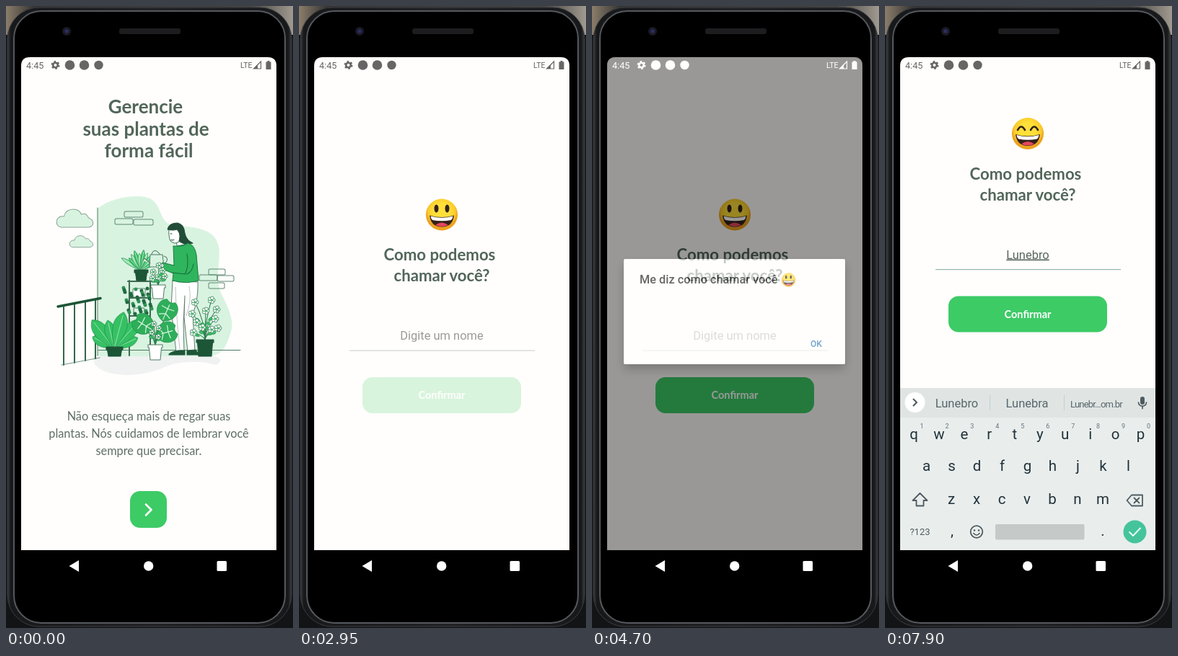
Recreate the animation shown at these times as an HTML page. Size 398x863 px, loop 8000 ms.

```html
<!DOCTYPE html>
<html lang="pt-BR">
<head>
<meta charset="utf-8">
<title>Plant care app</title>
<style>
  html, body { margin: 0; width: 100%; height: 100%; overflow: hidden; background: #131416; }
  svg { display: block; width: 398px; height: 863px; font-family: Roboto, sans-serif; }
  .mid { text-anchor: middle; }
  .geo { font-family: Lato, sans-serif; text-anchor: middle; fill: #52665a; }
  .title { font-weight: 700; font-size: 26px; }
  .ask { font-weight: 700; font-size: 22.2px; }
  .body { font-size: 16.3px; fill: #5f6f67; }
  .key { font-size: 20.5px; fill: #22323a; text-anchor: middle; }
  .caps .key { text-transform: uppercase; }
  .small { font-size: 9px; fill: #66727a; text-anchor: middle; }
  .hint { font-size: 16.5px; fill: #59666a; text-anchor: middle; }
  .line { fill: none; stroke-linecap: round; stroke-linejoin: round; }
</style>
</head>
<body>
<svg viewBox="0 0 398 863">
  <defs>
    <clipPath id="screenClip"><path d="M21 755V83Q21 71 33 71H363Q375 71 375 83V755Z"/></clipPath>
    <linearGradient id="room"><stop stop-color="#8b7d6a"/><stop offset=".1" stop-color="#333"/><stop offset=".85" stop-color="#44423e"/><stop offset="1" stop-color="#a09a90"/></linearGradient>
    <linearGradient id="rim"><stop stop-color="#3b3d41"/><stop offset=".012" stop-color="#17181a"/><stop offset=".5" stop-color="#222326"/><stop offset=".988" stop-color="#17181a"/><stop offset="1" stop-color="#3b3d41"/></linearGradient>
    <radialGradient id="skin" cy=".4"><stop offset=".5" stop-color="#ffe03a"/><stop offset=".85" stop-color="#fccb2a"/><stop offset="1" stop-color="#eda21f"/></radialGradient>
    <filter id="shadow" x="-20%" y="-20%" width="140%" height="150%"><feDropShadow dx="0" dy="7" stdDeviation="7" flood-opacity=".45"/></filter>
    <g id="mouth">
      <circle r="22" fill="url(#skin)"/>
      <path d="M-17 1Q0 6 17 1Q15 17 0 17Q-15 17 -17 1Z" fill="#35211c"/>
      <path d="M-15.5 2Q0 6.5 15.5 2Q15 6 13 7.5Q0 10 -13 7.5Q-15 6 -15.5 2Z" fill="#fff"/>
      <path d="M-9 14.5Q0 7.5 9 14.5Q0 18.5 -9 14.5Z" fill="#e8465f"/>
    </g>
    <g id="openFace">
      <use href="#mouth"/>
      <ellipse cx="-7.5" cy="-8.5" rx="3" ry="5.6" fill="#33211c"/><ellipse cx="7.5" cy="-8.5" rx="3" ry="5.6" fill="#33211c"/>
    </g>
    <g id="smileFace">
      <use href="#mouth"/>
      <path class="line" d="M-14 -5Q-9 -14 -4 -5M4 -5Q9 -14 14 -5" stroke="#33211c" stroke-width="2.6"/>
    </g>
  </defs>

  <!-- phone -->
  <rect width="398" height="40" fill="url(#room)"/>
  <rect x="2" y="2" width="394" height="859" rx="44" fill="url(#rim)" stroke="#3a3c40"/>
  <rect x="11" y="7" width="376" height="849" rx="38" stroke="#55585d" stroke-width="2"/>
  <circle cx="84" cy="35" r="6" fill="#1a1a22"/><circle cx="84" cy="35" r="2.7" fill="#2c2c66"/>
  <rect x="157" y="31" width="85" height="8" rx="3" fill="#1d1d1f"/>

  <g clip-path="url(#screenClip)">
    <rect x="21" y="71" width="354" height="684" fill="#fffefc"/>

    <g id="welcome">
      <g class="geo title">
        <text x="193.5" y="149">Gerencie</text><text x="194" y="180">suas plantas de</text><text x="198" y="210">forma fácil</text>
      </g>
      <g id="art"></g>
      <g class="geo body">
        <text class="body" x="198" y="575">Não esqueça mais de regar suas</text>
        <text class="body" x="198" y="599">plantas. Nós cuidamos de lembrar você</text>
        <text class="body" x="198" y="623">sempre que precisar.</text>
      </g>
      <g id="next">
        <rect x="172" y="673" width="51" height="51" rx="14" fill="#3dcb66"/>
        <path class="line" d="M194 691.5L201.5 699L194 706.5" stroke="#fff" stroke-width="2.6"/>
      </g>
    </g>

    <g id="form">
      <g id="lift">
        <use id="face" x="198" y="289.5"/>
        <g class="geo ask"><text x="195" y="353">Como podemos</text><text x="198" y="382">chamar você?</text></g>
        <text id="name" class="mid" x="198" y="463" font-size="16.45"></text>
        <rect id="caret" y="445" width="2" height="22" fill="#22a565"/>
        <rect id="rule" x="70" y="477.5" width="257" height="1.2"/>
        <g id="confirm">
          <rect x="88" y="515" width="220" height="50" rx="14" fill="#3dcb66"/>
          <text class="geo" x="198" y="545" font-size="14.5" font-weight="700" style="fill:#fff">Confirmar</text>
        </g>
      </g>
    </g>

    <g id="modal">
      <rect x="21" y="71" width="354" height="684" opacity=".6"/>
      <rect x="44" y="351" width="307" height="146" rx="2" fill="#fffefd" filter="url(#shadow)"/>
      <g font-weight="500">
        <text x="66" y="385" font-size="16.3" fill="#1c1c1c">Me diz como chamar você</text>
        <text x="303" y="473" font-size="12" fill="#2a76b8">OK</text>
      </g>
      <use href="#openFace" transform="translate(272.5 380) scale(.44)"/>
    </g>

    <g id="status">
      <text x="28" y="86.5" font-size="12.6">4:45</text>
      <circle cx="68.5" cy="82" r="3.3" fill="none" stroke="currentColor" stroke-width="2.6"/>
      <circle cx="68.5" cy="82" r="5" fill="none" stroke="currentColor" stroke-width="2" stroke-dasharray="2.62"/>
      <circle cx="88.5" cy="82" r="6.8"/><circle cx="108.5" cy="82" r="6.8"/>
      <circle cx="128.5" cy="82" r="6.2"/>
      <text x="325" y="85.5" font-size="10.5">LTE</text>
      <path d="M343.5 87L353.5 77V87Z" fill="none" stroke="currentColor" stroke-width="1.2"/><path d="M343.5 87L349 81.5V87Z"/>
      <path d="M360.5 77.5H362.5V76H365.5V77.5H367.5V88H360.5Z"/>
    </g>
  </g>

  <g id="keyboard"></g>
  <g fill="#fff">
    <path d="M87.5 777L101 769V785Z"/><circle cx="197.7" cy="777" r="6.7"/><rect x="292.5" y="770" width="13.5" height="14" rx="1.5"/>
  </g>
</svg>

<script>
const $ = id => document.getElementById(id);
const set = (id, attrs) => { for (const k in attrs) $(id).setAttribute(k, attrs[k]); };
const INK = '#4f7a62', DARK = '#1d5537', GREEN = '#35c163', PALE = '#d9f3e1';

// --- drawing helpers ---
const path = (d, fill = 'none', stroke = INK, w = 1) =>
  `<path class="line" d="${d}" style="fill:${fill}" stroke="${stroke}" stroke-width="${w}"/>`;
const box = (x, y, w, h, fill, stroke = INK, r = 1.5) =>
  `<rect x="${x}" y="${y}" width="${w}" height="${h}" rx="${r}" fill="${fill}" stroke="${stroke}"/>`;
const dot = (x, y, r, fill, stroke = 'none') =>
  `<circle cx="${x}" cy="${y}" r="${r}" fill="${fill}" stroke="${stroke}" stroke-width=".8"/>`;
const at = (x, y, turn, inner) => `<g transform="translate(${x} ${y}) rotate(${turn})">${inner}</g>`;
const leaf = (x, y, turn, len, w, fill, rib) => at(x, y, turn,
  path(`M0 0C${-w} ${-len * .5} ${-w} ${-len * .8} 0 ${-len}C${w} ${-len * .8} ${w} ${-len * .5} 0 0`, fill, '#218a4b', .6) +
  path(`M0 0V${-len * .9}`, 'none', rib, .8));
const monstera = (x, y, turn) => at(x, y, turn,
  path('M0 15C-18 10 -18 -11 -6 -15Q0 -10 6 -15C18 -11 18 10 0 15Z', '#2fae5a', '#218a4b', .6) +
  path('M0 13V-9M0 4L-8 8M0 4L8 8M0 -3L-9 -4M0 -3L9 -4', 'none', '#d5f5df', 1.2));
const flower = (x, y, r = 2) => {
  let s = '';
  for (let a = 0; a < 5; a++) s += dot(x + r * 1.2 * Math.cos(a * 1.257), y + r * 1.2 * Math.sin(a * 1.257), r, '#fff', '#2f7d50');
  return s + dot(x, y, r * .6, GREEN);
};
const bouquet = (x, y, heads, r) =>
  heads.map(([a, b]) => path(`M${x} ${y}Q${x} ${(y + b) / 2} ${a} ${b}`, 'none', '#2f7d50')).join('') +
  heads.map(([a, b], i) => leaf((x + a) / 2, (y + b) / 2, i % 2 ? 60 : -60, 7, 2.5, GREEN, GREEN) + flower(a, b, r)).join('');
const pot = (x, y, w, h, fill, stroke) =>
  path(`M${x} ${y}h${w}v4h-1.5l-1.5 ${h - 4}h${6 - w}l-1.5 ${4 - h}h-1.5Z`, fill, stroke);

function drawArt() {
  let s = path('M122 487Q160 482 290 486Q304 490 292 498Q262 490 230 497Q180 520 140 508Q118 500 122 487Z', '#f0f2f1', 'none');
  s += path('M127 281C145 266 180 261 197 266C216 272 212 300 230 304C258 306 288 308 294 330C300 350 288 375 298 398C308 418 318 436 311 455C305 474 300 482 285 486H127Z', PALE, 'none');
  // clouds and bricks
  const cloud = 'M-19 12Q-27 10 -25 2Q-22 -4 -15 -3Q-13 -13 -2 -13Q6 -13 9 -6Q16 -9 19 -1Q26 1 25 8Q23 12 18 12Z';
  s += at(95.5, 295, 0, path(cloud, PALE, '#8aa497'));
  s += `<g transform="translate(104.5 327) scale(.64)">${path(cloud, PALE, '#8aa497', 1.5)}</g>`;
  [[164, 285, 26], [151, 295, 25], [177, 296, 27], [281, 365, 23], [268, 373, 25], [293, 374, 23], [281, 384, 22]]
    .forEach(([x, y, w]) => s += box(x, y, w, 8, 'none', '#5f8a72', 2));
  s += path('M127 280V485M128 477.5H325', 'none', INK);
  // railing
  [80, 95, 110, 124].forEach(x => s += path(`M${x} ${432 - x / 5}V${514 - x / 5}`, 'none', DARK, 1.8));
  s += path('M77 498L130 488', 'none', INK, .8) + path('M72 417L131 405.5', 'none', DARK, 3.5);
  // shelf
  s += path('M171 381V485M200 381V485M169 382H202M171 405H200M171 430H200M171 453H200', 'none', '#3f6b53', 2);
  for (let i = -4; i < 6; i++) s += leaf(187, 367, i * 13 - 5, 24 + i * i * 5 % 9, 3.5, i % 2 ? GREEN : '#8fe0a9', '#c8f2d4');
  s += pot(178, 366, 19, 15, DARK, DARK) + box(176, 392, 17, 12, '#fff') + box(177, 419, 15, 10, PALE);
  for (let i = 0; i < 34; i++) s += dot(163 + i * 37 % 40, 391 + i * 23 % 37, 2.5, i % 3 ? '#1f6b40' : '#2f9457');
  // watering can
  s += path('M200 345H217L219 362H199ZM200 357L192 350L190 353M202 344Q206 335 213 344M219 347Q228 350 219 359', PALE, INK);
  // woman
  s += path('M231 381L266 383Q267 406 259 428L262 479L252 480L247 432L248 402L246 440L247 480L236 480L229 420Z', '#fff', '#637a6e');
  s += path('M254 389Q258 408 250 430M235 390Q236 430 241 476', 'none', '#a9b8b0', .8);
  s += path('M226 483Q233 477 248 478V484H226ZM251 478L263 477L268 484H251Z', DARK, DARK);
  s += path('M236 322L237 333L248 331L244 320Z', '#fff', INK);
  s += path('M226 308Q225 316 227 324Q232 332 240 327L243 312L236 306Z', '#fff', INK);
  s += path('M228 316L230 316M229 324Q231 326 233 324', 'none', DARK);
  s += path('M224 310Q226 301 238 301Q247 303 248 315Q250 325 259 329Q249 333 240 326Q243 316 237 310Q231 312 224 310Z', '#214c38', '#214c38');
  s += path('M232 333Q246 334 252 329Q262 332 264 345L267 381Q250 386 231 381L232 371L215 364L217 356L233 360Z', '#2fb55d', '#1f7a43');
  s += path('M251 344Q254 362 248 372L231 370M250 372Q258 370 260 358', 'none', '#17693a');
  s += `<ellipse cx="214" cy="360" rx="5" ry="3" fill="#fff" stroke="${INK}"/>`;
  // plants on the floor and lower shelf
  s += bouquet(211, 389, [[204, 369], [217, 367], [211, 376], [220, 375], [203, 378], [212, 360]], 1.9) + pot(201, 387, 20, 19, '#fff');
  [[-62, 34, 9], [66, 36, 9], [-38, 50, 13], [42, 54, 12], [-13, 40, 10], [15, 52, 13]]
    .forEach(([turn, len, w]) => s += leaf(150, 475, turn, len, w, GREEN, '#a5e8ba'));
  s += pot(139, 473, 23, 13, DARK, DARK);
  s += path('M207 470Q210 450 222 432M207 470Q203 455 193 444M207 470Q210 458 220 453', 'none', '#218a4b', 1.3);
  s += monstera(223, 423, 24) + monstera(191, 442, -58) + monstera(222, 453, 75);
  s += bouquet(207, 470, [[205, 441], [212, 447], [202, 453], [211, 459]], 1.8) + pot(197, 470, 20, 21, '#fff');
  s += bouquet(276, 464, [[262, 411], [285, 408], [292, 421], [258, 427], [277, 423], [264, 439], [290, 434], [285, 449], [260, 453], [294, 447], [272, 446]], 2.3);
  $('art').innerHTML = s + pot(264, 463, 24, 23, DARK, DARK);
}

function drawKeyboard() {
  const grey = '#4f5b60';
  const rows = [['qwertyuiop', 40, 34.95, 601], ['asdfghjkl', 57.5, 35, 645], ['zxcvbnm', 92, 35, 691]];
  let s = '<rect x="21" y="530" width="354" height="225" fill="#e9eeed"/><rect x="21" y="530" width="354" height="41" fill="#e0e5e4"/>';
  s += dot(41.5, 550, 14, '#fff') + path('M39.5 545.5L44 550L39.5 554.5', 'none', '#4d575b', 2);
  s += path('M145.5 540V561M248.5 540V561', 'none', '#c6cecd');
  [99.5, 197, 293].forEach((x, i) => s += `<text class="hint" id="hint${i}" x="${x}" y="557"></text>`);
  s += `<rect x="354" y="542" width="6" height="11" rx="3" fill="${grey}"/>` + path('M351.5 550Q352 555 357 555Q362 555 362.5 550M357 555V558.5', 'none', grey, 1.7);
  rows.forEach(([letters, x, step, y], r) => [...letters].forEach((c, i) => {
    s += `<text class="key" x="${x + i * step}" y="${y}">${c}</text>`;
    if (!r) s += `<text class="small" x="${x + 11 + i * step}" y="586">${(i + 1) % 10}</text>`;
  }));
  s += `<path id="shift" class="line" d="M48.5 676L58.5 686H53.5V693.5H43.5V686H38.5Z" stroke="${grey}" stroke-width="1.8"/>`;
  s += path('M342 678.5H357V693.5H342L335.5 686ZM345.5 682.5L352.5 689.5M352.5 682.5L345.5 689.5', 'none', grey, 1.8);
  s += `<text class="mid" x="48.5" y="734" font-size="13" fill="${grey}">?123</text><text class="key" x="93" y="735" font-size="17">,</text><text class="key" x="302" y="735">.</text>`;
  s += `<circle cx="127" cy="729.5" r="8.3" fill="none" stroke="${grey}" stroke-width="1.8"/>` + dot(124, 727.5, 1.3, grey) + dot(130, 727.5, 1.3, grey) + path('M122.8 731.5Q127 736.5 131.2 731.5', 'none', grey, 1.6);
  s += '<rect x="153" y="719" width="123.500" height="21.500" rx="2" fill="#c5cac9"/>';
  $('keyboard').innerHTML = s + dot(346.5, 729.5, 16, '#45c49b') + path('M339 730L344 735L354 724.5', 'none', '#e4fbf2', 2);
}

// --- timing ---
const clamp = x => Math.max(0, Math.min(1, x));
const ramp = (t, a, b) => clamp((t - a) / (b - a));

// cubic-bezier(.35, .45, 0, 1)
function navEase(x) {
  let lo = 0, hi = 1, u;
  for (let i = 0; i < 20; i++) {
    u = (lo + hi) / 2;
    if (1.05 * (1 - u) ** 2 * u + u ** 3 < x) lo = u; else hi = u;
  }
  return 1.35 * (1 - u) ** 2 * u + 3 * (1 - u) * u * u + u ** 3;
}

const NAME = 'Lunebro';
const strokes = [6300, 6750, 6800, 6950, 7050, 7250, 7400];
const hints = [
  [6400, 'L', 'Let', 'Love'], [6800, 'Lu', 'Lua', 'Luz'],
  [7050, 'Lune', 'Luneta', 'Lunar'], [7500, NAME, 'Lunebra', 'Lunebr...om.br'],
];
const zoom = k => `translate(198 413) scale(${k}) translate(-198 -413)`;

function render(t) {
  const p = navEase(ramp(t, 1067, 1467));
  set('welcome', { opacity: clamp(1 - (p - .2075) / .7925), transform: zoom(1 + .1 * p) });
  set('form', { opacity: ramp(p, .75, .875), transform: zoom(.85 + .15 * p) });
  set('next', { opacity: t >= 850 && t < 950 ? .3 : 1 });
  set('confirm', { opacity: t >= 2950 && t < 3500 ? .2 : 1 });

  const dim = ramp(t, 3050, 3250) * (1 - ramp(t, 4650, 4800));
  set('modal', { opacity: dim });
  const tint = dim > .5 ? '#fff' : '#666';
  set('status', { fill: tint, color: tint });

  const rise = 1 - (1 - ramp(t, 5260, 5580)) ** 2;
  set('keyboard', { opacity: rise, transform: `translate(0 ${44 * (1 - rise)})`, class: t < 6300 ? 'caps' : '' });
  set('shift', { fill: t < 6300 ? '#4f5b60' : 'none' });
  set('lift', { transform: `translate(0 ${t < 5450 ? 0 : -112.5})` });

  const typed = NAME.slice(0, strokes.filter(s => t >= s).length);
  const name = $('name');
  name.textContent = typed || 'Digite um nome';
  set('name', {
    fill: typed ? '#58655f' : t < 5250 ? '#999' : '#777',
    'text-decoration': typed ? 'underline' : 'none',
  });
  const caretOn = t >= 5250 && t < 5800 || t >= 6300 && t < 7900;
  set('caret', { x: 197 + (typed ? name.getComputedTextLength() / 2 + 1 : 0), opacity: +caretOn });
  set('rule', { fill: t < 5300 ? '#d0d3d1' : '#93b5b3' });
  set('face', { href: typed ? '#smileFace' : '#openFace' });

  const row = hints.filter(h => t >= h[0]).pop() || [];
  for (let i = 0; i < 3; i++) {
    const word = row[i + 1] || '', long = word.length > 9;
    $('hint' + i).textContent = word;
    $('hint' + i).style.cssText = long ? 'font-size:13px;letter-spacing:-.8px' : '';
  }
}

drawArt();
drawKeyboard();
const start = performance.now();
function tick() {
  const t = (performance.now() - start) % 8000;
  render(Math.floor(t / 50) * 50);
  requestAnimationFrame(tick);
}
tick();
</script>
</body>
</html>
```
